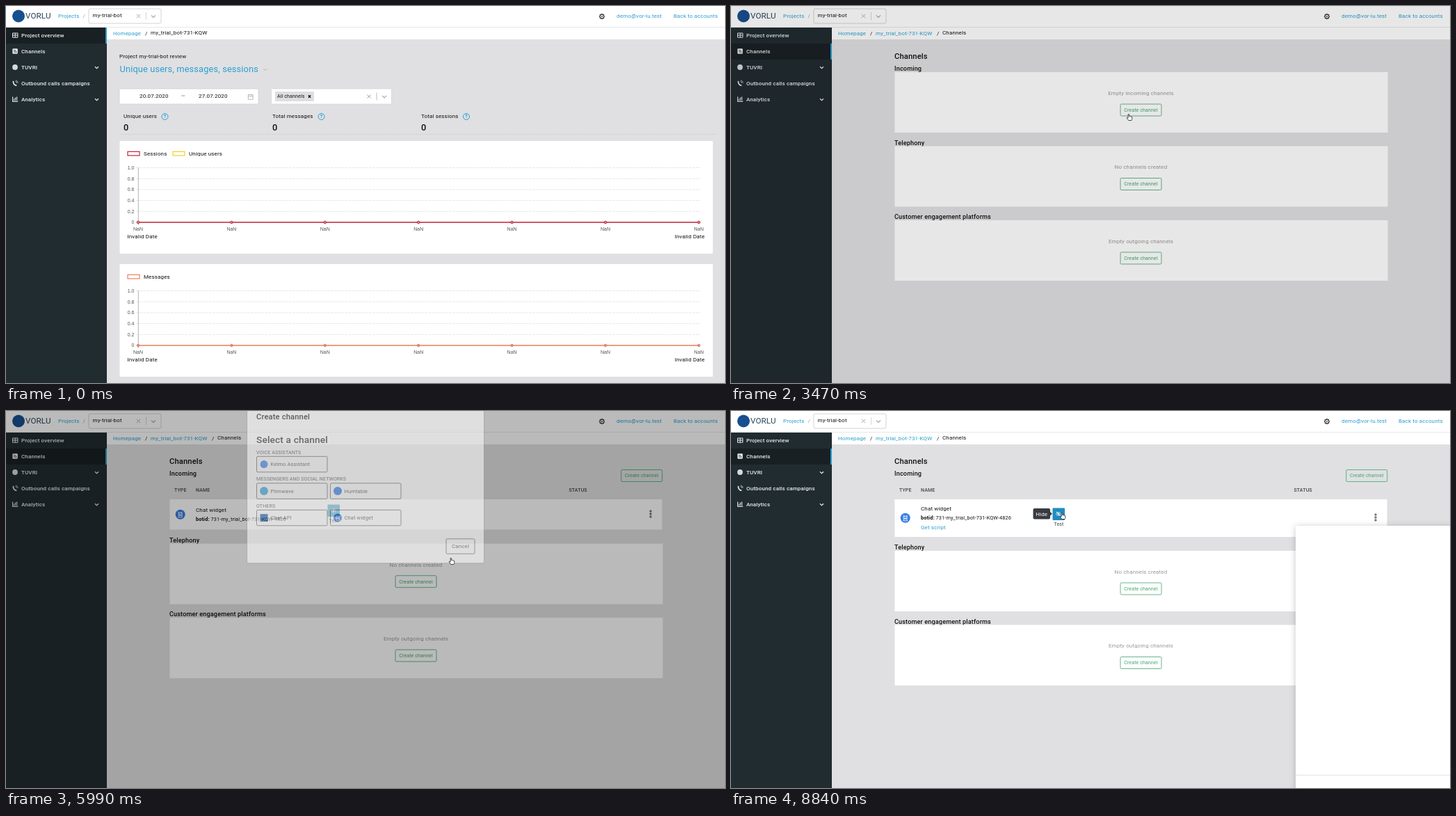
Animation of 1034 by 542 pixels, one loop 8.89 s. Source, as an HTML page:

```html
<!DOCTYPE html>
<html lang="en">
<head>
<meta charset="utf-8">
<title>Channel setup</title>
<style>
html, body { margin: 0; width: 100%; height: 100%; overflow: hidden; background: #e0e0e2; }
svg { display: block; width: 100vw; height: 100vh; }
text { font-family: Roboto, "Open Sans", sans-serif; letter-spacing: .14px; white-space: pre; }
text.axis { font-family: "Liberation Sans", Arial, sans-serif; letter-spacing: 0; }
</style>
</head>
<body>
<svg id="stage" viewBox="0 0 1034 542" preserveAspectRatio="none"></svg>
<script>
const LOOP = 8890;
const BLUE = '#2a9fd0', GREEN = '#3fa56c', DARK = '#192024', SIDE = '#212c30', ROBOT = '#377de0';
const APP = 'my-trial-bot', BOT = 'my_trial_bot-731-KQW';

// ---- drawing helpers; text y is the middle of the capitals ----
const text = (x, y, s, { size = 8, fill = '#111', weight = 400, anchor = 'start', cls = '' } = {}) =>
  `<text x="${x}" y="${y + size * .355}" font-size="${size}" fill="${fill}" font-weight="${weight}" text-anchor="${anchor}" class="${cls}">${s}</text>`;
const rect = (x, y, w, h, fill, stroke = 'none', r = 0, sw = .8) =>
  `<rect x="${x}" y="${y}" width="${w}" height="${h}" rx="${r}" fill="${fill}" stroke="${stroke}" stroke-width="${sw}"/>`;
const circle = (x, y, r, fill, stroke = 'none', sw = 1) =>
  `<circle cx="${x}" cy="${y}" r="${r}" fill="${fill}" stroke="${stroke}" stroke-width="${sw}"/>`;
const path = (d, stroke, sw = 1, fill = 'none', extra = '') =>
  `<path d="${d}" fill="${fill}" stroke="${stroke}" stroke-width="${sw}" ${extra}/>`;
const group = (id, body, extra = '') => `<g id="${id}" ${extra}>${body}</g>`;
const chevron = (x, y, color, r = 2.5, sw = 1.2) =>
  path(`M${x - r} ${y - r / 2}l${r} ${r}l${r} ${-r}`, color, sw);
const cross = (x, y, r, color, sw = 1) =>
  path(`M${x - r} ${y - r}l${2 * r} ${2 * r}m0 ${-2 * r}l${-2 * r} ${2 * r}`, color, sw);

function button(x, y, w, h, label, fill, stroke, color, size = 8) {
  return rect(x, y, w, h, fill, stroke, 1.5) +
    text(x + w / 2, y + h / 2, label, { size, fill: color, anchor: 'middle' });
}
const createButton = (x, y) => button(x, y, 59, 17, 'Create channel', 'none', GREEN, GREEN, 7);

function robot(x, y, r) {
  const k = r / 10;
  return circle(x, y, r, ROBOT) + `<g transform="translate(${x} ${y}) scale(${k})">` +
    path('M-3.6 -3.5h7.2v5h-7.2zM-2.5 -3.5l-1.2 -2.3M2.5 -3.5l1.2 -2.3M-4 5.8c0 -3 1.5 -4.3 4 -4.3s4 1.3 4 4.3z', '#fff', 1.2) +
    circle(-1.5, -1, .8, '#fff') + circle(1.5, -1, .8, '#fff') + '</g>';
}

// ---- header and sidebar ----
function header() {
  const gear = Array.from({ length: 8 }, (_, i) => {
    const a = i * Math.PI / 4, c = Math.cos(a), s = Math.sin(a);
    return `M${857 + 2.8 * c} ${15 + 2.8 * s}L${857 + 4.2 * c} ${15 + 4.2 * s}`;
  }).join('');
  return rect(0, 0, 1034, 31, '#fff') + rect(145, 30, 889, 18, '#fff') +
    path('M0 30.5H1034', '#dcdfe0', .7) +
    circle(18, 14.5, 9, '#174f8f') +
    text(28, 13.5, 'VORLU', { size: 11.6, fill: '#24425a' }) +
    text(75, 14.5, 'Projects', { fill: BLUE }) + text(110.5, 14.5, '/', { fill: '#999' }) +
    rect(119, 4, 104, 21, '#fff', '#c9c9c9', 2) + text(124.5, 13.5, APP) +
    cross(190.5, 14.5, 2.6, '#aaa') + path('M201.5 9v11', '#ccc', .8) + chevron(212, 15, '#aaa', 3) +
    circle(857, 15, 2.9, 'none', '#333', 1.1) + path(gear, '#333', 1.2) + circle(857, 15, 1, '#333') +
    text(878, 14.5, 'demo@vor-lu.test', { fill: BLUE }) +
    text(960, 14.5, 'Back to accounts', { fill: BLUE });
}

function sidebar() {
  const labels = ['Project overview', 'Channels', 'TUVRI', 'Outbound calls campaigns', 'Analytics'];
  const ink = '#e9eced';
  const icons =
    path('M9.5 39h7.4v6.2H9.5zM9.5 42h7.4M13.2 39v6.2', ink, 1) +
    rect(9.4, 61.3, 7.4, 7.4, ink, 'none', 1) +
    path('M11 63.3a4 4 0 0 1 4 4M11 65.3a2 2 0 0 1 2 2', DARK, .8) +
    circle(13, 88, 3.9, '#d5d9da') +
    path('M10.5 107.8c-.5 3.5 1.5 6.2 4.8 6.6', ink, 1.7) +
    path('M13.5 108.5a3 3 0 0 1 2.3 2.5M13.8 106.8a5 5 0 0 1 3.6 3.8', ink, .7) +
    path('M9.6 130.5v6.6h7.6M11.6 135.6v-2M13.5 135.6v-4M15.6 135.6v-5', ink, 1.1);
  return rect(0, 31, 145, 511, SIDE) +
    group('overviewBg', rect(0, 31, 145, 23, DARK) + rect(143, 31, 2, 23, BLUE)) +
    group('channelsHover', rect(0, 54, 145, 23, DARK)) +
    group('channelsBar', rect(143, 54, 2, 23, BLUE)) + icons +
    labels.map((s, i) => text(22, 42 + 23 * i, s, { fill: ink, weight: 500 })).join('') +
    chevron(130.5, 88.5, ink) + chevron(130.5, 134.5, ink);
}

// ---- overview page ----
function chart(top, color, legend) {
  const xs = Array.from({ length: 7 }, (_, i) => 190 + i * 134.4);
  const base = top + 117;
  let out = rect(163.5, top, 853, 162, '#fff', 'none', 1) + legend;
  for (let i = 0; i < 6; i++) {
    const y = base - i * 15.7;
    out += path(`M187 ${y}H998`, '#dedede', .7, 'none', 'stroke-dasharray="4 1"') +
      text(184.5, y, i ? (i / 5).toFixed(1) : '0', { size: 7, fill: '#555', anchor: 'end', cls: 'axis' });
  }
  out += `<g class="columns">` + xs.slice(1).map(x =>
    path(`M${x} ${top + 38}V${base}`, '#dcdcdc', .8, 'none', 'stroke-dasharray="4 1"')).join('') + '</g>';
  out += path(`M190.3 ${top + 38}V${base + 4}`, '#aaa', .9) + path(`M190 ${base}H996.5`, color, 1.5);
  xs.forEach(x => {
    out += circle(x, base, 1.8, '#b99', color, 1) +
      text(x, base + 10, 'NaN', { size: 7, fill: '#555', anchor: 'middle', cls: 'axis' });
  });
  return out + text(174.5, base + 20.5, 'Invalid Date') +
    text(1005, base + 20.5, 'Invalid Date', { anchor: 'end' });
}

function overview() {
  const key = (x, y, color, s) => rect(x, y - 2.6, 17, 5.6, '#fff', color, 0, 1.2) + text(x + 23, y, s);
  const stat = (x, s, qx) => text(x, 158.5, s) + text(x, 174, '0', { size: 12.8, weight: 500 }) +
    circle(qx, 159, 4.5, 'none', BLUE, 1) + text(qx, 159, '?', { size: 7, fill: BLUE, weight: 700, anchor: 'middle' });
  return text(154, 39.5, 'Homepage', { fill: BLUE }) + text(200, 39, '/') + text(208, 38.5, BOT) +
    text(163, 72.5, `Project ${APP} review`) +
    text(163.5, 90.5, 'Unique users, messages, sessions', { size: 12.8, fill: BLUE }) +
    chevron(373, 91.5, '#aaa', 2.5, .9) +
    rect(163, 119, 200, 22, '#fff', '#cfcfd1', 1) + text(192, 129.5, '20.07.2020') +
    text(252, 128.5, '~', { fill: '#666' }) + text(277, 129.5, '27.07.2020') +
    path('M348.3 127.7h6.8v6.6h-6.8zM348.3 130h6.8M350 126.5v2M353.4 126.5v2', '#aaa', .8) +
    rect(381.5, 119, 173, 22, '#fff', '#d6d6d8', 1) + rect(387, 123, 56, 14, '#dedee0', 'none', 1) +
    text(390, 129.5, 'All channels', { size: 7 }) + cross(436.5, 130, 1.7, '#111', 1.3) +
    cross(522, 130, 2.6, '#aaa') + path('M533 124.5v11', '#aaa', .8) + chevron(544, 130.5, '#aaa', 3) +
    stat(169, 'Unique users', 228.5) + stat(383, 'Total messages', 453.5) + stat(597, 'Total sessions', 662) +
    path('M163 184.5H1023', '#c9c9cc', .7, 'none', 'stroke-dasharray="2 1"') +
    `<g class="columns">` + path('M376.5 146V183M590.5 146V183', '#cfcfd2', .7, 'none', 'stroke-dasharray="2 1"') + '</g>' +
    chart(194, '#c62339', key(175, 212, '#c62339', 'Sessions') + key(240, 212, '#f2d21f', 'Unique users')) +
    chart(371, '#ee7f60', key(175, 389, '#ee7f60', 'Messages'));
}

// ---- channels page ----
const emptyCard = (y, s) => rect(235.5, y, 709, 87, '#fff') +
  text(589.5, y + 30, s, { fill: '#999', anchor: 'middle' }) + createButton(560, y + 46);
const section = (y, s) => text(235, y, s, { size: 9.1, weight: 500 });

function channels() {
  const head = s => ({ size: 7, weight: 500, fill: '#444', ...s });
  const eye = path('M467.3 148q3.7 -4.6 7.4 0q-3.7 4.6 -7.4 0z', '#fff', .8) + circle(471, 148, 1.3, '#fff');
  const dots = [-4, 0, 4].map(d => circle(927, 153 + d, 1.7, '#777')).join('');
  return text(154, 39.5, 'Homepage', { fill: BLUE }) + text(200, 39, '/') +
    text(208, 39.5, BOT, { fill: BLUE }) + text(296, 39, '/') + text(304, 38.5, 'Channels') +
    text(235, 72.5, 'Channels', { size: 11.2, weight: 500 }) + section(90, 'Incoming') +
    group('noIncoming', emptyCard(95, 'Empty incoming channels')) +
    group('incoming',
      createButton(884.7, 84.5) + text(242, 114, 'TYPE', head()) + text(273, 114, 'NAME', head()) +
      text(809.5, 114, 'STATUS', head()) +
      `<rect id="row" x="235.5" y="127" width="708" height="54" fill="#fff"/>` +
      group('rowText', text(273, 140, 'Chat widget') +
        text(273, 153, `<tspan font-weight="700">botid:</tspan> 731-${BOT}-4826`, { size: 7.3 })) +
      group('script', text(273, 167, 'Get script', { fill: BLUE })) +
      group('rowTools', robot(250.7, 153.7, 7) + dots +
        rect(462.5, 139.5, 17.5, 17.5, '#1f8cc0', 'none', 1) + eye +
        group('slash', path('M467.5 144.8l7 6.4', '#fff', 1)) +
        text(471.5, 162.7, 'Test', { size: 7, fill: '#444', anchor: 'middle' }))) +
    group('lower', section(196.5, 'Telephony') + emptyCard(201.5, 'No channels created') +
      section(303, 'Customer engagement platforms') + emptyCard(308, 'Empty outgoing channels'));
}

// ---- dialog ----
function dialog() {
  const caption = (y, s) => text(360, y, s, { size: 7, fill: '#555' });
  const option = (x, y, s, icon) => rect(x, y, 101.5, 22.5, '#fff', '#555', 1.5) + icon +
    text(x + 20, y + 11.3, s, { size: 7.5, fill: '#555' });
  const field = (y, h, s) => rect(448, y, 224, h, '#fff', '#bbb', 2) + text(456, y + 11, s, { fill: '#666' });
  const tab = (x, w, s, fill) => button(x, 69, w, 22, s, fill, '#555', '#444');
  const pick = text(360, 52, 'Select a channel', { size: 13.7, weight: 500, fill: '#222' }) +
    caption(70.5, 'VOICE ASSISTANTS') +
    option(360.5, 76, 'Kelmo Assistant', circle(371, 87.3, 5.5, '#4285f4')) +
    caption(108.7, 'MESSENGERS AND SOCIAL NETWORKS') +
    option(360.5, 114.5, 'Plimwave', circle(371, 125.8, 6, '#3aa5dc')) +
    option(466.5, 114.5, 'Humtable', circle(477, 125.8, 6, '#2f7df0')) +
    caption(147, 'OTHERS') +
    option(360.5, 153, 'Chat API', rect(365.5, 158.8, 11, 11, '#1d5fa8')) +
    option(466.5, 153, 'Chat widget', robot(477, 164.3, 6)) +
    button(633, 194.5, 41, 21.5, 'Cancel', '#fff', '#555', '#555');
  const form = robot(373, 51.7, 10.7) + text(394, 52, 'Chat widget', { size: 8.8, weight: 500 }) +
    tab(360.5, 104.5, 'Connection params', '#e4e4e4') + tab(465, 104.3, 'Widget config', '#fff') +
    tab(569.3, 104.3, 'Engagement', '#fff') +
    text(362, 112, 'Name') + field(101.5, 21.5, 'Name') +
    text(362, 157, 'Access token') + field(140.5, 35, 'Enter token') +
    rect(360, 185.7, 320, 3.6, '#c1c1c1', 'none', 1) +
    button(360.5, 207.3, 33.5, 21, 'Back', '#565656', '#565656', '#fff') +
    button(593, 207.3, 36.3, 21, 'Close', '#fff', '#666', '#555') +
    button(634, 207.3, 39.7, 21, 'Create', '#259fd2', '#259fd2', '#fff');
  return `<rect id="sheet" x="346.5" y="-40" width="341" height="285" rx="2" fill="#fff" stroke="#666" stroke-width=".5"/>` +
    text(360, 18.5, 'Create channel', { size: 11.2, weight: 500 }) +
    cross(676.5, 8, 2.4, BLUE, 1.5) + group('pick', pick) + group('form', form);
}

const chat = () => rect(812, 165, 230, 385, '#fff', 'none', 2).replace('/>', ' filter="url(#shadow)"/>') +
  path('M812 523.5H1034', '#dedede', .8);

const tooltip = () => rect(434.5, 140, 24.5, 15.5, '#383c40', 'none', 2) +
  path('M459 145l3 2.8l-3 2.8z', 'none', 0, '#383c40') +
  text(446.7, 148, 'Hide', { fill: '#fff', anchor: 'middle' });

const hand = () => path('M-1.9 -4.3q1 -.9 1.6 .2v2.8q.8 -.6 1.4 .2q.9 -.5 1.4 .3q1.1 -.3 1.3 .8v2.2q-.1 1.2 -.8 2.3h-4.3q-.9 -1.6 -2.4 -3.3q-.3 -1.2 .9 -.8l.9 .8z',
  '#222', .8, '#fff', 'stroke-linejoin="round"');

const stage = document.getElementById('stage');
stage.innerHTML =
  `<defs><filter id="shadow" x="-20%" y="-20%" width="140%" height="140%"><feDropShadow dx="0" dy="1" stdDeviation="5" flood-opacity=".22"/></filter></defs>` +
  rect(0, 0, 1034, 542, '#e0e0e2') + header() + sidebar() +
  group('overview', overview()) + group('channels', channels()) + group('chat', chat()) + group('tip', tooltip()) +
  `<rect id="shade" width="1034" height="542" fill="#000"/>` + group('dialog', dialog()) + group('cursor', hand());

// ---- timeline ----
const el = id => document.getElementById(id);
const columns = document.querySelectorAll('.columns');
const show = (id, on) => el(id).setAttribute('display', on ? 'inline' : 'none');
const alpha = (id, a) => el(id).setAttribute('opacity', a);
const move = (id, x, y) => el(id).setAttribute('transform', `translate(${x} ${y})`);
const ramp = (t, start, length) => Math.min(1, Math.max(0, (t - start) / length));
const smooth = p => p * p * (3 - 2 * p);
const easeOut = p => 1 - Math.pow(1 - p, 1.8);

const OPEN = 3443, CLOSE = 5922, PAGE = 1880, FORM = 4400, SCRIPT = 6250, TEST = 7100;
const TRACK = [[200, 168, 552], [1000, 101, 74], [2050, 101, 74], [2950, 573, 160], [3720, 573, 160],
  [4150, 517, 157], [4450, 517, 157], [5025, 653, 213], [5700, 653, 213], [5960, 641, 216],
  [6080, 641, 216], [6800, 477, 151]];

function cursorAt(t) {
  let at = TRACK[0].slice(1);
  for (let i = 1; i < TRACK.length; i++) {
    const [t0, x0, y0] = TRACK[i - 1], [t1, x1, y1] = TRACK[i];
    if (t < t0) break;
    const p = smooth(ramp(t, t0, t1 - t0));
    at = [x0 + (x1 - x0) * p, y0 + (y1 - y0) * p];
  }
  return at;
}

function render(t) {
  const onChannels = t >= PAGE, created = t >= 5850, scripted = t >= SCRIPT;
  const [x, y] = cursorAt(t);
  move('cursor', x, y);
  show('cursor', t > 200);

  show('overview', !onChannels);
  show('channels', onChannels);
  show('overviewBg', !onChannels);
  show('channelsHover', onChannels || (x < 145 && y > 54 && y < 77));
  show('channelsBar', onChannels);
  columns.forEach(c => c.setAttribute('opacity', t < 450 ? 0 : 1));

  // the row grows once its script link arrives
  show('noIncoming', !created);
  show('incoming', created);
  show('script', scripted);
  show('slash', t >= TEST);
  el('row').setAttribute('height', scripted ? 54 : 43.5);
  move('rowText', 0, scripted ? 0 : 2);
  move('rowTools', 0, scripted ? 0 : -5);
  move('lower', 0, !created ? 0 : scripted ? -.5 : -10.8);

  const isForm = t >= FORM && t < CLOSE;
  const leave = 1 - ramp(t, CLOSE, 150);
  const slide = t < CLOSE ? 1 - easeOut(ramp(t, 3500, 300)) : easeOut(ramp(t, CLOSE, 300));
  alpha('shade', .5 * ramp(t, OPEN, 150) * leave);
  alpha('dialog', ramp(t, 3500, 150) * leave);
  move('dialog', 0, -28.5 * slide);
  show('pick', !isForm);
  show('form', isForm);
  el('sheet').setAttribute('height', isForm ? 285 : 269.5);

  alpha('chat', ramp(t, TEST + 50, 150));
  alpha('tip', ramp(t, 7560, 150));
}

function frame(now) {
  render(now % LOOP);
  requestAnimationFrame(frame);
}
render(0);
requestAnimationFrame(frame);
</script>
</body>
</html>
```
